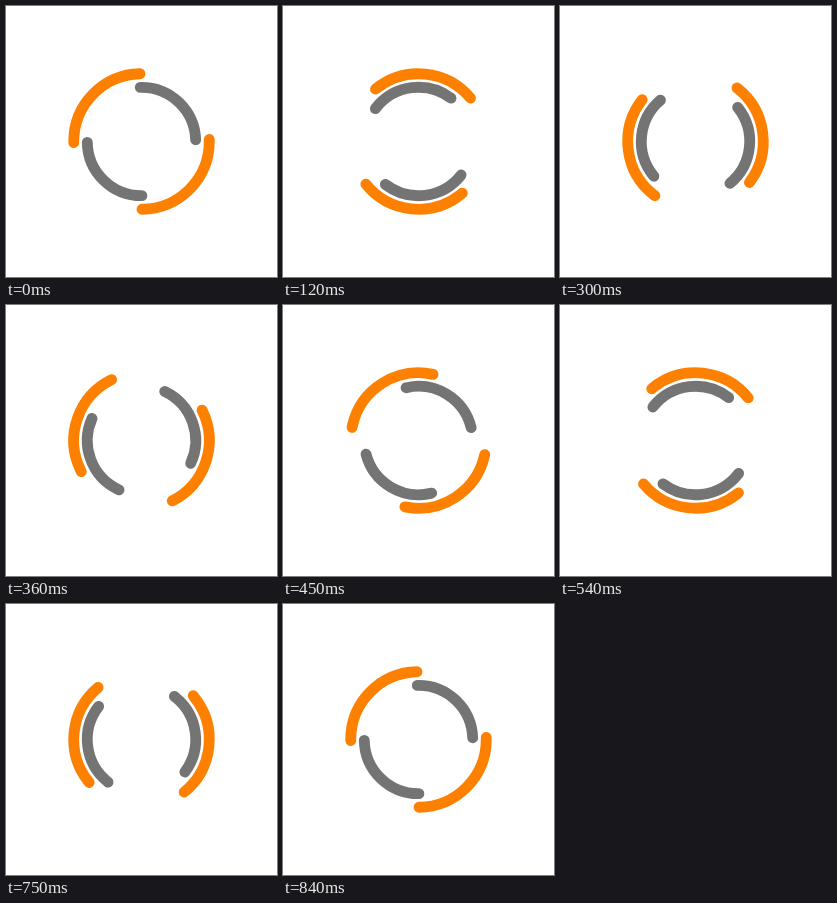
Animation of 271x271 px, one loop 0.87 s. Source, as an HTML page:

```html
<!DOCTYPE html>
<html lang="en">
<head>
<meta charset="utf-8">
<title>Loading spinner</title>
<style>
  html, body { margin: 0; height: 100%; overflow: hidden; background: #fff; }
  svg { display: block; width: 100%; height: 100%; }
  circle { fill: none; stroke-width: 4; stroke-linecap: round; stroke-dasharray: 1; }
  #outer { stroke: #fd8000; }
  #inner { stroke: #747474; stroke-dashoffset: 1; }
</style>
</head>
<body>
<svg viewBox="-50 -50 100 100">
  <circle id="outer" r="25" pathLength="4"/>
  <circle id="inner" r="20" pathLength="4"/>
</svg>
<script>
  const STEP = 30, LOOP = 870, TURN = 840;
  const outer = document.getElementById('outer');
  const inner = document.getElementById('inner');

  // The full turn ends one step early, so the rest pose is held across the loop.
  function draw() {
    const time = Math.floor(performance.now() % LOOP / STEP) * STEP;
    const angle = 360 * time / TURN;
    outer.setAttribute('transform', `rotate(${angle})`);
    inner.setAttribute('transform', `rotate(${-angle})`);
    requestAnimationFrame(draw);
  }
  draw();
</script>
</body>
</html>
```
